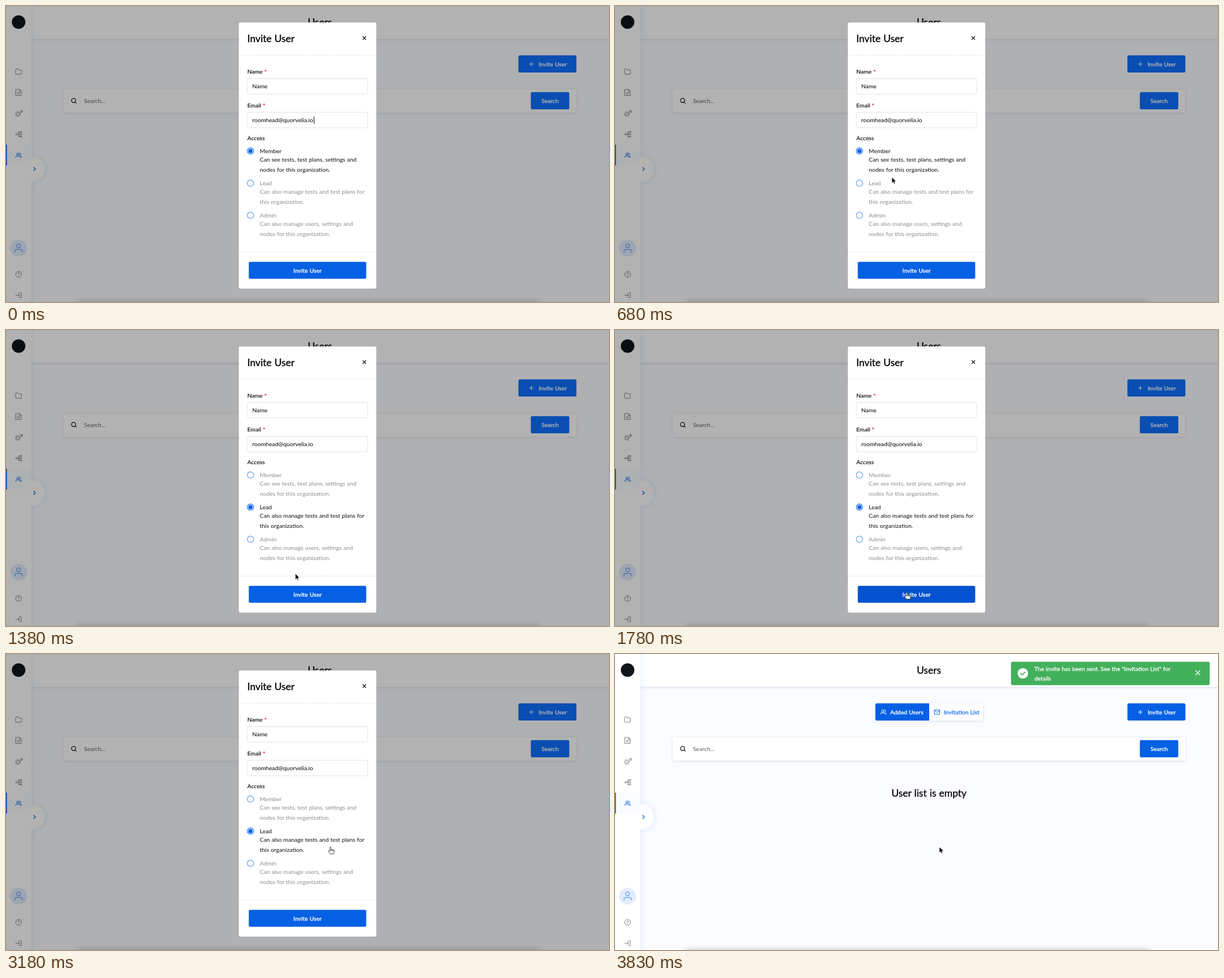
Animation, 1067 px wide and 525 px high, one loop 4.13 s. Source, as an HTML page:

```html
<!DOCTYPE html>
<html lang="en">
<head>
<meta charset="utf-8">
<title>Invite user</title>
<style>
html, body { margin: 0; width: 100%; height: 100%; overflow: hidden; }
svg { display: block; width: 100vw; height: 100vh; }
text { font: 10.4px Lato, "Open Sans", sans-serif; word-spacing: .03em; white-space: pre; }
.title { font-size: 17.5px; stroke: #000; stroke-width: .3px; }
.label { stroke: #000; stroke-width: .12px; }
.strong { font-weight: 500; stroke-width: .3px; }
.white.strong { stroke: #fff; }
.mid { text-anchor: middle; }
.blue { fill: #0560e4; }
.white { fill: #fff; }
.icon { fill: none; stroke: #7d7f83; stroke-linecap: round; stroke-linejoin: round; }
</style>
</head>
<body>
<svg viewBox="0 0 1067 525">
  <defs>
    <filter id="blur" x="-20%" y="-300%" width="140%" height="700%"><feGaussianBlur stdDeviation="6"/></filter>
    <filter id="soft" x="-40%" y="-40%" width="180%" height="180%"><feDropShadow dx="0" dy="1" stdDeviation="2.5" flood-color="#1d3a70" flood-opacity=".13"/></filter>
    <filter id="glow" x="-60%" y="-10%" width="220%" height="120%"><feDropShadow dx="2" dy="0" stdDeviation="5" flood-color="#3c7de0" flood-opacity=".12"/></filter>
    <g id="people">
      <circle cx="-1.2" cy="-2" r="2"/>
      <path d="M-5 4V3.2Q-5 1.3-3 1.3H.6Q2.6 1.3 2.6 3.2V4M2-4Q3.7-3.6 3.7-2T2 0M3.4 1.5Q5 1.8 5 3.4V4"/>
    </g>
  </defs>

  <rect width="1067" height="525" fill="#fafcff"/>
  <rect x="125" y="525" width="820" height="12" opacity=".25" filter="url(#blur)"/>
  <rect x="44" y="-10" width="1040" height="68" class="white" filter="url(#soft)"/>
  <text x="555.5" y="35" class="title mid">Users</text>

  <g filter="url(#soft)" class="white">
    <rect x="461" y="87.7" width="190" height="30.2" rx="2"/>
    <rect x="102" y="148" width="907" height="41" rx="2"/>
  </g>
  <path d="M463 87.6H556V118H463Q460.7 118 460.7 116V89.6Q460.7 87.6 463 87.6Z" class="blue"/>
  <g id="actions" class="blue">
    <rect x="906.7" y="87.6" width="102.6" height="30.4" rx="2.5"/>
    <rect x="928.7" y="152.7" width="68" height="30.6" rx="2.5"/>
  </g>
  <use href="#people" x="475" y="103" class="icon" style="stroke:#fff"/>
  <text x="487" y="107" class="white strong">Added Users</text>
  <path d="M565.5 99.2H574.5V106.8H565.5ZM565.5 100L570 103.5 574.5 100" class="icon" style="stroke:#0560e4"/>
  <text x="582" y="107" fill="#2b7be8" stroke="#2b7be8" class="strong">Invitation List</text>
  <path d="M926 103H933M929.5 99.5V106.5" class="icon" style="stroke:#fff;stroke-width:1.1"/>
  <text x="942.5" y="107" class="white strong">Invite User</text>
  <text x="962.8" y="172" class="white strong mid">Search</text>
  <g class="icon" style="stroke:#111;stroke-width:1.3"><circle cx="119.6" cy="167.6" r="3.7"/><path d="M122.4 170.4L124.4 172.4"/></g>
  <text x="138" y="172" fill="#5a5a5a">Search...</text>
  <text x="555.7" y="253" class="title mid">User list is empty</text>

  <circle cx="45" cy="289" r="23.5" class="white" filter="url(#glow)"/>
  <rect y="-20" width="44.5" height="565" class="white" filter="url(#glow)"/>
  <path d="M40 266A23.5 23.5 0 0 1 40 312Z" class="white"/>
  <path d="M49 286L52 289 49 292" class="icon" style="stroke:#0560e4;stroke-width:1.3"/>
  <rect y="246" width="44.5" height="37" fill="#f9fbff"/>
  <rect y="246" width="1.6" height="37" class="blue"/>
  <circle cx="22.3" cy="28.5" r="12" fill="#101418"/>
  <g class="icon">
    <path d="M17 112.5Q17 111.5 18 111.5H20.6L22 113.2H26.3Q27.3 113.2 27.3 114.2V120Q27.3 121 26.3 121H18Q17 121 17 120Z"/>
    <path d="M17.5 148H24L27 151V158.7H17.5ZM24 148V151H27M19.7 153H24.7M19.7 155.7H24.7"/>
    <circle cx="21" cy="191.5" r="2.8"/><circle cx="21" cy="191.5" r="4.4" stroke-width="1.3" stroke-dasharray="1.4 2.05" stroke-linecap="butt"/>
    <circle cx="27.6" cy="187" r="1.6" stroke-width="1.2"/>
    <path d="M20.5 227.5H24.5M25 223.5H22.5V231.5H25"/>
    <circle cx="18.7" cy="227.5" r="1.6"/>
    <path d="M25 222.5H28V224.5H25ZM25 226.5H28V228.5H25ZM25 230.5H28V232.5H25Z" stroke-width=".8"/>
    <use href="#people" x="22.3" y="264.7" style="stroke:#0560e4"/>
    <circle cx="22.3" cy="476" r="5.2"/>
    <path d="M20.8 474.8Q20.8 473.3 22.3 473.3T23.8 474.8Q23.8 475.7 22.3 476.5V476.9M22.3 478.7V478.8"/>
    <path d="M23.5 508.7H27V517.3H23.5M17 513H24M21.5 510.4L24 513 21.5 515.6"/>
  </g>
  <circle cx="22.3" cy="429.5" r="15" fill="#e1ecfd"/>
  <g class="icon" style="stroke:#70a8f5;stroke-width:1.5"><circle cx="22.3" cy="425.3" r="3.4"/><path d="M15.8 436.3V435Q15.8 431.8 19 431.8H25.6Q28.8 431.8 28.8 435V436.3"/></g>

  <g id="modal">
    <rect width="1067" height="525" opacity=".3"/>
    <rect x="412" y="29.2" width="243.2" height="472" rx="3" class="white"/>
    <text x="427" y="64" class="title">Invite User</text>
    <path d="M631.4 54.2L636.8 59.6M636.8 54.2L631.4 59.6" class="icon" style="stroke:#111;stroke-width:1.3"/>
    <path d="M412 87H655M412 436.5H655" stroke="#dde1e6" stroke-dasharray="2 1"/>
    <g class="label">
      <text x="427" y="120">Name <tspan fill="#d0021b" stroke="#d0021b">*</tspan></text>
      <text x="427" y="180">Email <tspan fill="#d0021b" stroke="#d0021b">*</tspan></text>
      <text x="427" y="238">Access</text>
    </g>
    <g fill="#fff" stroke="#e1e3e6">
      <rect x="427" y="128.5" width="213" height="27.5" rx="2.5"/>
      <rect x="427" y="188.5" width="213" height="27.5" rx="2.5"/>
    </g>
    <text x="435.7" y="146">Name</text>
    <text x="435.7" y="206">roomhead@quorvelia.io</text>
    <rect id="caret" x="544.6" y="196" width="1" height="13"/>
    <g id="roles"></g>
    <rect id="send" x="429.6" y="453.7" width="207.8" height="30" rx="2.5"/>
    <text x="533.5" y="472.7" class="white strong mid">Invite User</text>
  </g>

  <g id="toast">
    <rect x="700.7" y="13.7" width="351.6" height="41.6" rx="2.5" fill="#43b05c"/>
    <circle cx="721.7" cy="34.3" r="9.3" class="white"/>
    <path d="M718 34.6L720.8 37.2 725.6 32" class="icon" style="stroke:#43b05c;stroke-width:1.7"/>
    <g class="white strong"><text x="742" y="30">The invite has been sent. See the "Invitation List" for</text><text x="742" y="47">details</text></g>
    <path d="M1027.5 29.5L1035 37M1035 29.5L1027.5 37" class="icon" style="stroke:#fff;stroke-width:1.4"/>
  </g>

  <g id="cursor">
    <path id="arrow" d="M0 0V10.6L2.4 8.4 4 12 5.8 11.2 4.2 7.8H7.5Z" stroke="#fff" stroke-width=".7"/>
    <path id="hand" d="M-1 7.5V1.3A1.1 1.1 0 0 1 1.2 1.3V5Q2.2 4.3 3.2 5.3 4.4 4.8 5.1 5.8 6.7 5.5 6.9 7V9Q6.9 10.5 5.7 12.5H0Q-1.5 10.3-3.4 8.5-4 7.2-2.8 6.9-1.9 6.9-1 8ZM1.2 5V7.5M3.2 5.3V7.5M5.1 5.8V7.6" fill="#fff" stroke="#111" stroke-width=".8" stroke-linejoin="round"/>
  </g>
</svg>
<script>
const LOOP = 4130, SENT = 3830;
const $ = id => document.getElementById(id);
const clamp = v => Math.max(0, Math.min(1, v));
const ramp = (t, start, length) => clamp((t - start) / length);
const show = (id, on) => { $(id).style.display = on ? '' : 'none'; };

const roles = [
  ['Member', 'Can see tests, test plans, settings and', 'nodes for this organization.'],
  ['Lead', 'Can also manage tests and test plans for', 'this organization.'],
  ['Admin', 'Can also manage users, settings and', 'nodes for this organization.'],
];
$('roles').innerHTML = roles.map((lines, i) => `<g transform="translate(0 ${257 + 57 * i})">
  <circle class="ring" cx="432.6" cy="0.2" r="5.6" fill="none" stroke="#0560e4" stroke-width="1.1"/>
  <circle class="dot blue" cx="432.6" cy="0.2" r="3.8"/>
  <g class="copy">${lines.map((s, n) => `<text x="449" y="${[4, 19, 37][n]}">${s}</text>`).join('')}</g></g>`).join('');
const rows = [...$('roles').children];

// Pointer path: time, x, y
const path = [
  [330, 528, 143], [430, 514, 212], [530, 500, 262], [630, 492, 295], [680, 490, 303.5],
  [830, 486, 310], [1130, 486, 310], [1180, 492, 333], [1280, 492, 333], [1330, 502, 385],
  [1380, 512, 432], [1480, 512, 432], [1580, 520, 452], [1680, 521, 462], [1780, 516, 465],
  [2080, 516, 465], [2130, 526, 438], [2230, 558, 370], [2330, 574, 342],
];

function pointerAt(t) {
  const i = path.findIndex(p => p[0] > t);
  if (i < 0) return path[path.length - 1].slice(1);
  if (i === 0) return path[0].slice(1);
  const [a, b] = [path[i - 1], path[i]], k = ramp(t, a[0], b[0] - a[0]);
  return [1, 2].map(n => a[n] + (b[n] - a[n]) * k);
}

const clickable = y => [[250, 297], [307, 355], [364, 412], [454, 483]].some(([top, end]) => y >= top && y <= end);

function draw(t) {
  const [x, y] = pointerAt(t), hand = t < 3530 && clickable(y);
  show('modal', t < SENT);
  show('toast', t >= SENT);
  show('caret', t < 330 || (t >= 830 && t < 880));
  show('cursor', t >= 330);
  show('hand', hand);
  show('arrow', !hand);
  $('cursor').setAttribute('transform', `translate(${x} ${y})`);
  $('actions').style.fill = t < SENT ? '#0e70ff' : '';

  const lead = ramp(t, 860, 120);
  [1 - lead, lead, 0].forEach((on, i) => {
    const part = name => rows[i].querySelector(name).style;
    part('.ring').opacity = .65 + .35 * on;
    part('.dot').opacity = on;
    part('.copy').opacity = .45 + .5 * on;
  });

  const hover = ramp(t, 1560, 200) * (1 - ramp(t, 2130, 150));
  $('send').style.fill = `rgb(${5 - hover}, ${96 - 14 * hover}, ${228 - 21 * hover})`;
}

const start = performance.now();
function tick() {
  draw((performance.now() - start) % LOOP);
  requestAnimationFrame(tick);
}
tick();
</script>
</body>
</html>
```
